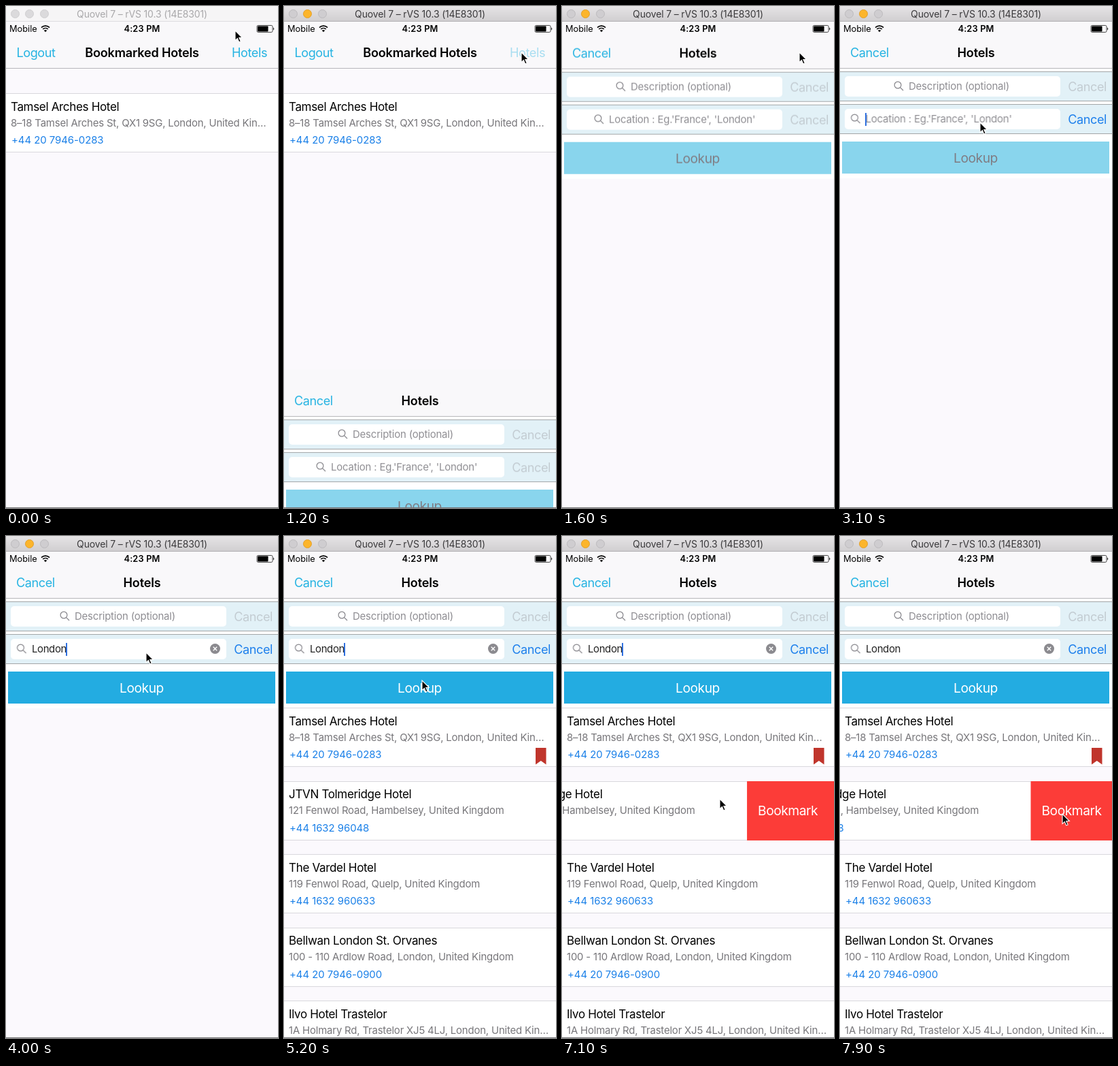
An HTML page for the animation above (8 s loop, 400 px wide and 737 px high).

```html
<!DOCTYPE html>
<html lang="en">
<head>
<meta charset="utf-8">
<title>Hotel bookmarks</title>
<style>
  html, body { margin: 0; width: 100%; height: 100%; overflow: hidden; }
  body { font-family: Inter, Roboto, sans-serif; font-optical-sizing: none; color: #000; }
  #stage { position: relative; width: 400px; height: 737px; overflow: hidden; background: #fbf9fd; }
  #stage div, #stage svg, .t { position: absolute; box-sizing: border-box; }

  /* Zero line height: top is the middle of the capitals */
  .t { line-height: 0; margin: 0; white-space: nowrap; font-weight: 400; }
  .mid { left: 0; width: 100%; text-align: center; }
  .s18 { font-size: 18.1px; letter-spacing: -.44px; }
  .s19 { font-size: 19.2px; letter-spacing: -.45px; }
  .s15 { font-size: 14.93px; letter-spacing: -.18px; }
  .bold { font-weight: 600; letter-spacing: -.19px; }
  .link { color: #25b3e2; }

  .anim { animation-duration: 8s; animation-iteration-count: infinite; }
  .step { animation-timing-function: step-end; }

  /* Window and status bars */
  .bar { inset: 0 0 auto; height: 23px; background: #f6f5f6; border-bottom: 1px solid #dedde0; color: #a9a8aa; }
  .bar.active { background: linear-gradient(#e6e4e6, #d0ced0); border-color: #b4b2b5; color: #3b3a3c; animation-name: wake; }
  .bar .t { top: 11.5px; font-size: 14px; letter-spacing: -.16px; }
  .bar div { top: 4.5px; width: 13px; height: 13px; border-radius: 50%; background: #dbdadc; border: 1px solid #d0cfd1; }
  .active div { background: #cfcdd0; border-color: #bcbabd; }
  .active .amber { background: #fcb52c; border-color: #e2a02a; }
  .status { top: 33.5px; font-size: 12.8px; }

  .nav { inset: 23px 0 auto; height: 69px; background: #f9f8fa; border-bottom: 1px solid #b7b6ba; }
  .nav .t { top: 45px; }

  /* Hotel rows */
  .row { left: 0; width: 100%; height: 87px; overflow: hidden; }
  .face { inset: 0; background: #fff; border: solid #d9d8dd; border-width: 1px 0; }
  .face h3 { left: 7px; top: 18.5px; font-size: 17.07px; letter-spacing: -.36px; }
  .face p { left: 7px; top: 42.5px; color: #77767a; }
  .face span { left: 8px; top: 68px; font-size: 14.93px; letter-spacing: -.05px; color: #1b80e8; }
  .face .mark { left: 400px; top: -1px; width: 400px; height: 87px; background: #fc3c38; }
  .face .mark span { left: 16px; top: 43px; color: #fff; font-size: 19.2px; letter-spacing: -.45px; }
  .swipe { animation-name: swipe; }

  /* Search sheet */
  .sheet { inset: 0; background: #fbf9fd; clip-path: inset(23px 0 0); animation-name: rise; }
  .form { inset: 92px 0 auto; height: 161px; background: #fff; }
  .search { left: 0; width: 100%; height: 44px; background: #e2f1f7; border: solid #a3a6a8; border-width: 1px 0; }
  .box { left: 7px; top: 6px; width: 317px; height: 30px; border-radius: 5px; background: #fff; }
  .hint { color: #8e8d92; }
  .search .t, .search .typed { top: 21px; }
  .search svg { top: 13px; width: 15px; height: 15px; fill: none; stroke: #85848a; stroke-width: 1.2; }
  .off { color: #c3ccd2; }
  .on { color: #1f80ec; }
  .go { left: 3px; width: 393px; top: 107px; height: 47px; }
  .go .t { top: 24px; }
  .typed { left: 38px; height: 0; display: flex; align-items: center; font-size: 14.93px; line-height: 0; color: #222; }
  .typed i { font-style: normal; letter-spacing: -.025em; }
  .typed b { width: 2px; height: 19px; margin-left: -1px; background: #2f70df; animation-name: blink; }

  .shift { animation-name: shift; }
  .focus { animation-name: focus; }
  .blur { animation-name: blur; }
  .filled { animation-name: filled; }
  .empty { animation-name: empty; }
  .found { animation-name: found; }
  .press { animation-name: press; }
  .pointer { width: 14px; height: 20px; left: -1px; top: -1px; overflow: visible; animation-name: pointer; }
  .edge { inset: auto 0 0; height: 1px; background: #78777a; }

  @keyframes wake { 0% { opacity: 0 } 13%, 100% { opacity: 1 } }
  @keyframes press { 0% { opacity: 1 } 13%, 100% { opacity: .38 } }
  @keyframes rise {
    0% { transform: translateY(714px) }
    14.352% {
      transform: translateY(714px);
      animation-timing-function: linear(0, .09, .264, .442, .594, .713, .801, .864, .908, .939, .96, .973,
        .983, .989, .993, .995, .997, .998, .999, .999, 1, 1, 1);
    }
    21.227%, 100% { transform: none }
  }
  @keyframes shift {
    0%, 35% { transform: none; animation-timing-function: ease-in-out }
    38.125%, 100% { transform: translateX(-31.5px) }
  }
  @keyframes focus { 0% { opacity: 0 } 35.5%, 100% { opacity: 1 } }
  @keyframes blur { 0% { opacity: 1 } 35.5%, 100% { opacity: 0 } }
  @keyframes filled { 0% { opacity: 0 } 42.5%, 100% { opacity: 1 } }
  @keyframes empty { 0% { opacity: 1 } 42.5%, 100% { opacity: 0 } }
  @keyframes found { 0% { opacity: 0 } 64.375%, 100% { opacity: 1 } }
  @keyframes blink {
    0%, 55.625%, 68.125%, 80.625%, 93.125%, 100% { opacity: 0 }
    36.25%, 61.875%, 74.375%, 86.875% { opacity: 1 }
  }
  @keyframes key1 { 0% { font-size: 0 } 42.5%, 100% { font-size: 14.93px } }
  @keyframes key2 { 0% { font-size: 0 } 43.75%, 100% { font-size: 14.93px } }
  @keyframes key3 { 0% { font-size: 0 } 45%, 100% { font-size: 14.93px } }
  @keyframes key4 { 0% { font-size: 0 } 46.25%, 100% { font-size: 14.93px } }
  @keyframes key5 { 0% { font-size: 0 } 47.5%, 100% { font-size: 14.93px } }
  @keyframes key6 { 0% { font-size: 0 } 48.75%, 100% { font-size: 14.93px } }
  @keyframes swipe {
    0%, 83.75% { transform: none; animation-timing-function: ease-in-out }
    88.75% { transform: translateX(-128px); animation-timing-function: ease-out }
    92%, 100% { transform: translateX(-119.5px) }
  }
  @keyframes pointer {
    0%, 2% { transform: translate(337px, 36px) }
    10%, 25% { transform: translate(349px, 68px) }
    33.5%, 51.5% { transform: translate(206px, 171px) }
    56.25%, 66% { transform: translate(203px, 212px) }
    76%, 83.75% { transform: translate(360px, 380px) }
    88.75%, 91% { transform: translate(232px, 386px) }
    97.5%, 100% { transform: translate(327px, 408px) }
  }
</style>
</head>
<body>
<svg width="0" height="0" style="position:absolute">
  <symbol id="lens" viewBox="0 0 15 15"><circle cx="6" cy="6" r="4.9"/><path d="M9.6 9.6 14 14"/></symbol>
</svg>
<div id="stage">
  <!-- Saved hotels -->
  <div class="nav">
    <span class="t s18 link" style="left:15.5px">Logout</span>
    <span class="t s18 bold mid">Bookmarked Hotels</span>
    <span class="t s18 link anim step press" style="right:16px">Hotels</span>
  </div>
  <div class="row" style="top:128px">
    <div class="face">
      <h3 class="t">Tamsel Arches Hotel</h3>
      <p class="t s15">8–18 Tamsel Arches St, QX1 9SG, London, United Kin…</p>
      <span class="t">+44 20 7946-0283</span>
    </div>
  </div>

  <!-- Search sheet -->
  <div class="sheet anim">
    <div class="nav">
      <span class="t s18 link" style="left:15px">Cancel</span>
      <span class="t s18 bold mid">Hotels</span>
    </div>
    <div class="form">
      <div class="search" style="top:4px">
        <div class="box"></div>
        <svg style="left:79px"><use href="#lens"/></svg>
        <span class="t s15 hint" style="left:101px">Description (optional)</span>
        <span class="t s18 off" style="right:8px">Cancel</span>
      </div>
      <div class="search" style="top:52px">
        <div class="box"></div>
        <svg class="anim shift" style="left:47px"><use href="#lens"/></svg>
        <div class="anim step empty" style="inset:0">
          <span class="t s15 hint anim shift" style="left:69px">Location : Eg.'France', 'London'</span>
        </div>
        <div class="typed">
          <i class="anim step" style="animation-name:key1">L</i>
          <i class="anim step" style="animation-name:key2">o</i>
          <i class="anim step" style="animation-name:key3">n</i>
          <i class="anim step" style="animation-name:key4">d</i>
          <i class="anim step" style="animation-name:key5">o</i>
          <i class="anim step" style="animation-name:key6">n</i>
          <b class="anim step"></b>
        </div>
        <svg class="anim step filled" style="left:300px" viewBox="0 0 15 15">
          <circle cx="7.5" cy="7.5" r="7.5" fill="#8b8a8f" stroke="none"/>
          <path d="M4.8 4.8l5.4 5.4m0-5.4l-5.4 5.4" stroke="#fff" stroke-width="1.4"/>
        </svg>
        <span class="t s18 off anim step blur" style="right:8px">Cancel</span>
        <span class="t s18 on anim step focus" style="right:8px">Cancel</span>
      </div>
      <div class="go" style="background:#89d5ed;color:#7f7c83"><span class="t s19 mid">Lookup</span></div>
      <div class="go anim step filled" style="background:#23ace1;color:#fff"><span class="t s19 mid">Lookup</span></div>
    </div>

    <!-- Results -->
    <div class="anim step found" style="inset:0">
      <div class="row" style="top:252px">
        <div class="face">
          <h3 class="t">Tamsel Arches Hotel</h3>
          <p class="t s15">8–18 Tamsel Arches St, QX1 9SG, London, United Kin…</p>
          <span class="t">+44 20 7946-0283</span>
          <svg style="left:370px;top:58px" width="16" height="25"><path d="M0 0h15.5v24.5l-7.75-5.5L0 24.5z" fill="#c0352c"/></svg>
        </div>
      </div>
      <div class="row" style="top:359.5px">
        <div class="face anim swipe">
          <h3 class="t">JTVN Tolmeridge Hotel</h3>
          <p class="t s15">121 Fenwol Road, Hambelsey, United Kingdom</p>
          <span class="t">+44 1632 96048</span>
          <div class="mark"><span class="t">Bookmark</span></div>
        </div>
      </div>
      <div class="row" style="top:467px">
        <div class="face">
          <h3 class="t">The Vardel Hotel</h3>
          <p class="t s15">119 Fenwol Road, Quelp, United Kingdom</p>
          <span class="t">+44 1632 960633</span>
        </div>
      </div>
      <div class="row" style="top:574.5px">
        <div class="face">
          <h3 class="t">Bellwan London St. Orvanes</h3>
          <p class="t s15">100 - 110 Ardlow Road, London, United Kingdom</p>
          <span class="t">+44 20 7946-0900</span>
        </div>
      </div>
      <div class="row" style="top:682px">
        <div class="face">
          <h3 class="t">Ilvo Hotel Trastelor</h3>
          <p class="t s15">1A Holmary Rd, Trastelor XJ5 4LJ, London, United Kin…</p>
        </div>
      </div>
    </div>
  </div>

  <!-- Status bar -->
  <span class="t status" style="left:5px">Mobile</span>
  <svg style="left:51px;top:27px" width="14" height="12" fill="none" stroke="#000" stroke-width="1.7">
    <path d="M1 4.6a8.6 8.6 0 0 1 12 0M3.2 7a5.5 5.5 0 0 1 7.6 0"/>
    <path d="M7 11.2 4.9 9a3 3 0 0 1 4.2 0z" fill="#000" stroke="none"/>
  </svg>
  <span class="t status bold mid" style="letter-spacing:.15px">4:23 PM</span>
  <svg style="left:368px;top:27px" width="28" height="13">
    <rect x="1" y="1.5" width="23" height="10" rx="1.8" fill="none" stroke="#333" stroke-width=".9"/>
    <rect x="2" y="2.5" width="15.5" height="8" rx=".8"/>
    <path d="M25 4.5a2.2 2.2 0 0 1 0 4z" fill="#333"/>
  </svg>

  <!-- Window bar -->
  <div class="bar">
    <div style="left:6.5px"></div><div style="left:28px"></div><div style="left:49.5px"></div>
    <span class="t mid">Quovel 7 – rVS 10.3 (14E8301)</span>
  </div>
  <div class="bar active anim step">
    <div style="left:6.5px"></div><div class="amber" style="left:28px"></div><div style="left:49.5px"></div>
    <span class="t mid">Quovel 7 – rVS 10.3 (14E8301)</span>
  </div>
  <div class="edge"></div>

  <svg class="pointer anim" viewBox="-1 -1 14 20">
    <path d="M0 0v14.6l3.4-3.2 2.3 5.5 2.4-1-2.3-5.4h4.6z" stroke="#fff" stroke-width="1.1"/>
  </svg>
</div>
</body>
</html>
```
